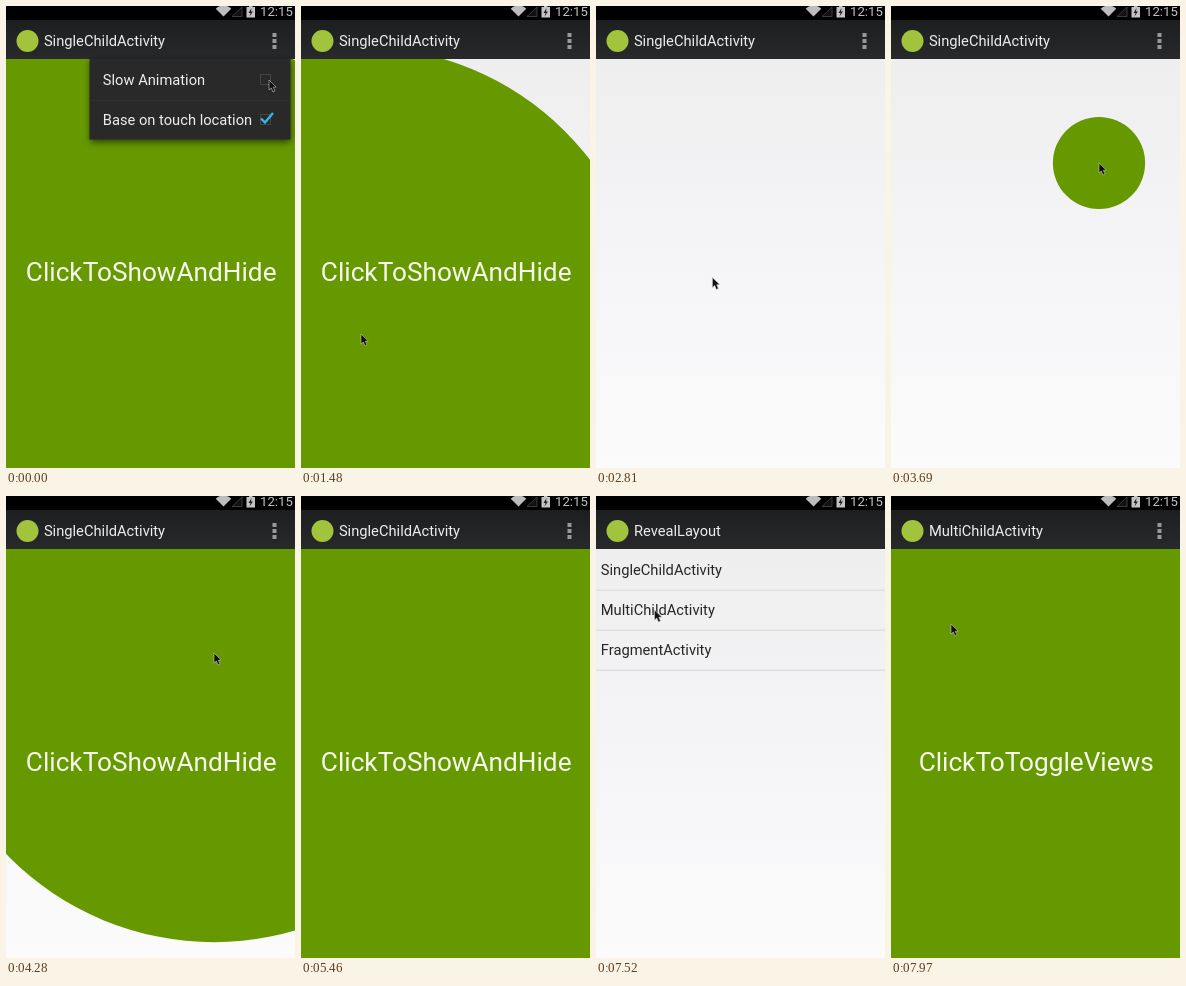
Write an HTML page with a canvas that moves like this. It is 289 px wide and 462 px high and loops after 8000 ms.

```html
<!DOCTYPE html>
<html lang="en">
<head>
<meta charset="utf-8">
<title>Reveal layout demo</title>
<style>
html, body { margin: 0; height: 100%; overflow: hidden; background: #000; }
canvas { display: block; }
</style>
</head>
<body>
<canvas id="stage" width="289" height="462"></canvas>
<script>
const W = 289, H = 462, LOOP = 8000, STEP = 147.4;
const BAR_TOP = 14, BAR_BOTTOM = 53;
const GREEN = '#669900';
const ctx = document.getElementById('stage').getContext('2d');

// Pointer tip: [time, x, y]
const pointerPath = [
  [0, 263, 74], [300, 263, 74], [1030, 60, 328], [1480, 60, 328],
  [2063, 78, 320], [2500, 84, 312], [3380, 208, 157], [4740, 208, 157],
  [5380, 70, 475], [6650, 50, 475], [7370, 58.5, 114], [7660, 58.5, 114], [7960, 60, 128]
];

const clamp = v => Math.max(0, Math.min(1, v));
const progress = (t, start, duration) => clamp((t - start) / duration);
const ease = p => (1 - Math.cos(Math.PI * p)) / 2;
const decelerate = p => 1 - (1 - p) ** 2;

function rect(x, y, w, h, fill) {
  ctx.fillStyle = fill;
  ctx.fillRect(x, y, w, h);
}

function circle(x, y, r) {
  ctx.beginPath();
  ctx.arc(x, y, r, 0, 2 * Math.PI);
}

function poly(points, fill, stroke, width = 1) {
  ctx.beginPath();
  points.forEach(([x, y]) => ctx.lineTo(x, y));
  if (fill) {
    ctx.closePath();
    ctx.fillStyle = fill;
    ctx.fill();
  }
  if (stroke) {
    ctx.strokeStyle = stroke;
    ctx.lineWidth = width;
    ctx.stroke();
  }
}

function text(str, x, y, size, fill, align = 'left') {
  ctx.font = `${size}px Roboto, sans-serif`;
  ctx.textAlign = align;
  ctx.fillStyle = fill;
  ctx.fillText(str, x, y);
}

function gradient(y0, y1, ...colors) {
  const g = ctx.createLinearGradient(0, y0, 0, y1);
  colors.forEach((c, i) => g.addColorStop(i / (colors.length - 1), c));
  return g;
}

function statusBar() {
  rect(0, 0, W, BAR_TOP, '#000');
  ctx.beginPath();
  ctx.moveTo(217.5, 10.5);
  ctx.arc(217.5, 10.5, 11, -Math.PI * 0.75, -Math.PI * 0.25);
  ctx.fillStyle = '#bdbdbd';
  ctx.fill();
  poly([[226, 10.5], [236, 10.5], [236, 1]], '#111', '#3c3c3c');
  rect(240.5, 1, 8.5, 10.5, '#c4c4c4');
  rect(243, 0, 3.5, 1, '#c4c4c4');
  poly([[245.5, 2], [242.5, 7], [244.5, 7], [243.5, 10.5], [247, 5.5], [245, 5.5]], '#222');
  text('12:15', 254, 10, 13.2, '#c2c2c2');
}

function actionBar(title, hasMenu) {
  rect(0, BAR_TOP, W, BAR_BOTTOM - BAR_TOP, gradient(BAR_TOP, BAR_BOTTOM, '#1d1e20', '#28292a'));
  circle(21.5, 35, 11);
  ctx.fillStyle = '#a1c43c';
  ctx.fill();
  text(title, 37.9, 40, 14.7, '#ededed');
  if (hasMenu) for (const y of [27, 33, 39]) rect(266.5, y, 4, 4, '#999');
}

function page() {
  rect(0, BAR_BOTTOM, W, H - BAR_BOTTOM, gradient(BAR_BOTTOM, H, '#eeeeef', '#f5f5f7', '#fbfbfc'));
}

function greenPanel(label) {
  rect(0, BAR_BOTTOM, W, H - BAR_BOTTOM, GREEN);
  text(label, 145.2, 275, 26.2, '#f6f9ee', 'center');
}

function singleChild(t) {
  actionBar('SingleChildActivity', true);
  page();
  ctx.save();
  ctx.beginPath();
  ctx.rect(0, BAR_BOTTOM, W, H - BAR_BOTTOM);
  ctx.clip();
  if (t < 3000) {
    circle(61, 328, 356 * (1 - ease(progress(t, 1072, 1384))));
  } else {
    circle(208, 157, 370 * ease(progress(t, 3391, 1280)));
  }
  ctx.clip();
  greenPanel('ClickToShowAndHide');
  ctx.restore();
}

function multiChild() {
  actionBar('MultiChildActivity', true);
  greenPanel('ClickToToggleViews');
}

function activityList() {
  actionBar('RevealLayout', false);
  page();
  ['SingleChildActivity', 'MultiChildActivity', 'FragmentActivity'].forEach((name, i) => {
    text(name, 4.8, 79.2 + 40 * i, 14.7, '#262626');
    rect(0, 93.5 + 40 * i, W, 1.5, '#e0e0e0');
  });
}

function popupMenu() {
  ctx.save();
  ctx.shadowColor = 'rgba(0,0,0,.6)';
  ctx.shadowBlur = 7;
  ctx.shadowOffsetY = 2;
  rect(83.5, 53, 201, 80.5, '#29292a');
  ctx.restore();
  rect(83.5, 94, 201, 1, '#2f3031');
  text('Slow Animation', 96.8, 79, 14.7, '#ededed');
  text('Base on touch location', 96.8, 118.7, 14.7, '#ededed');
  ctx.lineWidth = 1;
  ctx.strokeStyle = '#444';
  for (const y of [68.5, 108.5]) ctx.strokeRect(254.5, y, 10, 10);
  poly([[255, 112.5], [259, 116.5], [267, 107]], null, '#33b5e5', 2.4);
}

function pointer(t) {
  const i = pointerPath.findIndex(key => key[0] > t);
  const [t1, x1, y1] = pointerPath.at(i);
  const [t0, x0, y0] = i > 0 ? pointerPath[i - 1] : [0, x1, y1];
  const p = ease(progress(t, t0, t1 - t0));
  ctx.save();
  ctx.translate(x0 + (x1 - x0) * p, y0 + (y1 - y0) * p);
  poly([[0, 0], [0, 10], [2.3, 8], [4, 12], [6, 11], [4.3, 7.3], [7.2, 7]], '#111', '#ccc', 0.6);
  ctx.restore();
}

// Window transition: fades and scales between 80% and 100%
function withWindow(amount, drawWindow) {
  if (amount <= 0) return;
  const scale = 0.8 + 0.2 * amount;
  ctx.save();
  ctx.globalAlpha = amount;
  ctx.translate(W / 2, H / 2);
  ctx.scale(scale, scale);
  ctx.translate(-W / 2, -H / 2);
  drawWindow();
  ctx.restore();
}

function draw(t) {
  if (t < 6400) {
    singleChild(t);
  } else {
    activityList();
    withWindow(1 - decelerate(progress(t, 6400, 300)), () => singleChild(t));
    withWindow(decelerate(progress(t, 7590, 300)), multiChild);
  }
  statusBar();
  ctx.globalAlpha = 1 - progress(t, 140, 250);
  if (ctx.globalAlpha > 0) popupMenu();
  ctx.globalAlpha = 1;
  pointer(t);
}

function tick() {
  const t = performance.now() % LOOP;
  draw(Math.floor(t / STEP) * STEP);
  requestAnimationFrame(tick);
}
tick();
</script>
</body>
</html>
```
